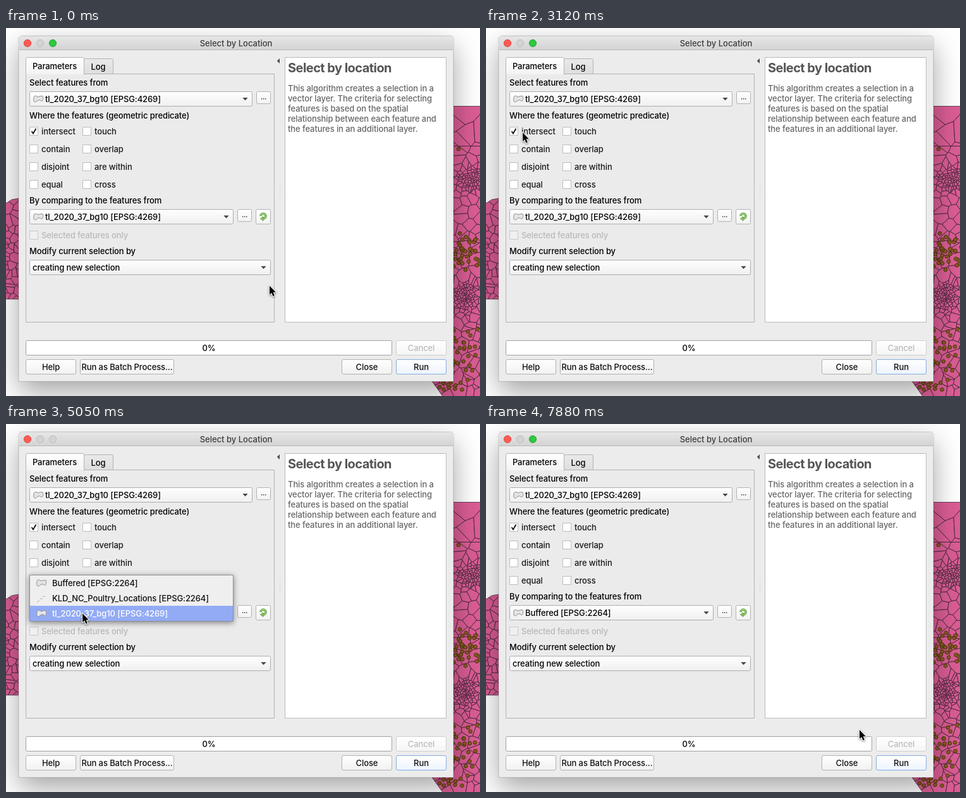
Write an HTML page with a canvas that moves like this. It is 750x581 px and loops after 8000 ms.

```html
<!DOCTYPE html>
<html lang="en">
<head>
<meta charset="utf-8">
<title>Select by Location</title>
<style>
html, body { margin: 0; width: 100%; height: 100%; overflow: hidden; background: #fff; }
canvas { display: block; width: 750px; height: 581px; }
</style>
</head>
<body>
<canvas id="stage" width="750" height="581"></canvas>
<script>
const W = 750, H = 581, LOOP = 8000;
const FONT = 'Inter, sans-serif';
const LAYERS = ['Buffered [EPSG:2264]', 'KLD_NC_Poultry_Locations [EPSG:2264]', 'tl_2020_37_bg10 [EPSG:4269]'];
let c = document.getElementById('stage').getContext('2d');

// ---- helpers ----
function random(seed) {
  return () => {
    seed = (seed + 0x6D2B79F5) | 0;
    let t = Math.imul(seed ^ (seed >>> 15), 1 | seed);
    t = (t + Math.imul(t ^ (t >>> 7), 61 | t)) ^ t;
    return ((t ^ (t >>> 14)) >>> 0) / 4294967296;
  };
}

function layer(draw) {
  const el = document.createElement('canvas');
  el.width = W;
  el.height = H;
  const saved = c;
  c = el.getContext('2d');
  draw();
  c = saved;
  return el;
}

function text(str, x, y, { size = 13, weight = 450, style = 'normal', color = '#000', align = 'left', track = -.1 } = {}) {
  c.font = `${style} ${weight} ${size}px ${FONT}`;
  c.letterSpacing = track + 'px';
  c.textAlign = align;
  c.fillStyle = color;
  c.fillText(str, x, y);
  return c.measureText(str).width;
}

function vertical(y0, y1, top, bottom) {
  const g = c.createLinearGradient(0, y0, 0, y1);
  g.addColorStop(0, top);
  g.addColorStop(1, bottom);
  return g;
}

function paint(fill, stroke, width = 1) {
  if (fill) { c.fillStyle = fill; c.fill(); }
  if (stroke) { c.strokeStyle = stroke; c.lineWidth = width; c.stroke(); }
}

// Bordered box whose outer edges are x0..x1, y0..y1.
function box(x0, y0, x1, y1, fill, stroke, r = 0) {
  c.beginPath();
  c.roundRect(x0 + .5, y0 + .5, x1 - x0 - 1, y1 - y0 - 1, r);
  paint(fill, stroke);
}

function poly(points, fill, stroke, width) {
  c.beginPath();
  points.forEach(([x, y]) => c.lineTo(x, y));
  c.closePath();
  paint(fill, stroke, width);
}

function disc(x, y, r, fill, stroke) {
  c.beginPath();
  c.arc(x, y, r, 0, 7);
  paint(fill, stroke);
}

function shadow(color, blur, dy, draw) {
  c.save();
  c.shadowColor = color;
  c.shadowBlur = blur;
  c.shadowOffsetY = dy;
  draw();
  c.restore();
}

// ---- map behind the window ----
const rect = (x0, y0, x1, y1) => [[x0, y0], [x1, y0], [x1, y1], [x0, y1]];

// Voronoi cell: cut the bounds by the bisector towards every other site.
function cell(site, sites, bounds) {
  let shape = bounds;
  for (const other of sites) {
    if (other === site) continue;
    const dx = other[0] - site[0], dy = other[1] - site[1];
    const mid = (dx * (other[0] + site[0]) + dy * (other[1] + site[1])) / 2;
    const side = p => p[0] * dx + p[1] * dy - mid;
    const next = [];
    shape.forEach((p, i) => {
      const q = shape[(i + 1) % shape.length], a = side(p), b = side(q);
      if (a <= 0) next.push(p);
      if (a * b < 0) next.push([p[0] + (q[0] - p[0]) * a / (a - b), p[1] + (q[1] - p[1]) * a / (a - b)]);
    });
    shape = next;
  }
  return shape;
}

function region(outline, sites, bounds) {
  const line = '#46293a';
  c.save();
  poly(outline, '#db5d94');
  c.clip();
  sites.forEach(s => poly(cell(s, sites, bounds), null, line, .7));
  c.restore();
  poly(outline, null, line, .8);
}

function drawMap() {
  const rnd = random(37);
  const spread = () => rnd() + rnd() + rnd() - 1.5;
  const many = (n, make) => Array.from({ length: n }, make);
  const scatter = (n, x, y, w, h) => many(n, () => [x + rnd() * w, y + rnd() * h]);
  const cluster = (n, x, y, r) => many(n, () => [x + spread() * r, y + spread() * r]);

  region([[-2, 278], [9, 271], [20, 269], [30, 269], [30, 428], [-2, 428]],
    scatter(46, -6, 265, 34, 165), rect(-20, 250, 40, 440));

  const sites = [
    ...scatter(5, 700, 128, 55, 55), ...scatter(130, 670, 190, 90, 395),
    ...cluster(85, 733, 238, 23), ...cluster(95, 727, 425, 26)
  ];
  region([[700, 123.5], [760, 123.5], [760, 590], [697, 590], [670, 552]], sites, rect(650, 100, 770, 600));
  poly([[700, 186.5], [760, 186.5]], null, '#46293a', .8);

  const dots = [[716, 191], ...cluster(38, 727, 354, 30), ...cluster(48, 722, 520, 46), ...scatter(8, 684, 558, 28, 14)];
  dots.forEach(([x, y]) => disc(x, y, 2.9, '#8b5a22', '#4f3414'));
}

// ---- widgets ----
function layerIcon(x, y) {
  c.beginPath();
  c.moveTo(x + 1, y + 3);
  c.bezierCurveTo(x + 1, y - 1, x + 5, y, x + 7, y + 1.5);
  c.bezierCurveTo(x + 9, y + 2.5, x + 15, y - 2, x + 15.5, y + 2);
  c.bezierCurveTo(x + 16, y + 6, x + 15, y + 9, x + 13, y + 8.5);
  c.bezierCurveTo(x + 10, y + 6, x + 8, y + 6, x + 5, y + 9.5);
  c.bezierCurveTo(x, y + 11, x + .5, y + 7, x + 1, y + 3);
  paint('#e4e4e4', '#8c8c8c');
}

function pointsIcon(x, y) {
  const rnd = random(5);
  c.fillStyle = '#a0a0a0';
  for (let i = 0; i < 6; i++) c.fillRect(x + i * 2.3, y + 9 - i * 1.6 + rnd() * 3, 1.3, 1.3);
}

function combo(x1, y, label, icon) {
  box(37, y, x1, y + 24, vertical(y, y + 24, '#ffffff', '#efefef'), '#adadad', 2);
  const ax = x1 - 11.5, ay = y + 10;
  poly([[ax - 4.2, ay], [ax + 4.2, ay], [ax, ay + 4.5]], '#484848');
  if (icon) layerIcon(43, y + 7);
  text(label, icon ? 62 : 42, y + 17);
}

function button(x0, x1, y, label, { color = '#111', border = '#b2b2b2', bottom = '#f1f1f1' } = {}) {
  box(x0, y, x1, y + 24, vertical(y, y + 24, '#ffffff', bottom), border, 2.5);
  text(label, (x0 + x1) / 2, y + 17, { align: 'center', color });
}

function dotsButton(x, y) {
  box(x, y, x + 23, y + 20, vertical(y, y + 20, '#ffffff', '#f2f2f2'), '#b2b2b2', 2);
  c.fillStyle = '#222';
  for (let i = 0; i < 3; i++) c.fillRect(x + 8 + i * 3, y + 11, 1.3, 1.5);
}

function checkbox(x, y, label, checked, off) {
  box(x, y, x + 14, y + 14, off ? '#f0f0f0' : '#fff', off ? '#c9c9c9' : '#bcbcbc');
  if (checked) {
    c.beginPath();
    c.moveTo(x + 3.5, y + 7);
    c.lineTo(x + 6, y + 10.5);
    c.lineTo(x + 10.5, y + 2.8);
    paint(null, '#111', 1.8);
  }
  text(label, x + 19, y + 12, { color: off ? '#b8b8b8' : '#1a1a1a' });
}

function iterateButton() {
  box(395, 286, 419, 310, vertical(286, 310, '#ffffff', '#f2f2f2'), '#b2b2b2', 2);
  for (const [color, width] of [['#5b9a3a', 3.6], ['#9ccf78', 1.8]]) {
    c.beginPath();
    c.arc(407, 297, 4, Math.PI, Math.PI * 2.5);
    paint(null, color, width);
  }
  poly([[402.5, 301], [407, 297.8], [407, 304.2]], '#9ccf78', '#5b9a3a');
}

// ---- dialog ----
function drawDialog() {
  const frame = (y, h) => {
    c.beginPath();
    c.roundRect(20, y, 688, h, [5, 5, 0, 0]);
  };
  shadow('rgba(0,0,0,.36)', 44, 16, () => {
    frame(13, 545);
    paint('#ececec');
  });
  frame(12.5, 545.5);
  paint(null, 'rgba(0,0,0,.18)');
  frame(13, 22);
  paint(vertical(13, 35, '#e6e6e6', '#d3d3d3'));
  c.fillStyle = '#b9b9b9';
  c.fillRect(20, 34, 688, 1);
  text('Select by Location', 364, 29, { align: 'center', color: '#3c3c3c', track: 0 });

  box(31, 72, 425, 465, '#ebebeb', '#b3b3b3');
  box(123, 48, 170, 73, vertical(48, 73, '#e9e9e9', '#dedede'), '#b3b3b3', [2, 2, 0, 0]);
  box(31, 46, 124, 74, vertical(46, 73, '#ffffff', '#f3f3f3'), '#b3b3b3', [2, 2, 0, 0]);
  c.fillStyle = '#ebebeb';
  c.fillRect(32, 73, 91, 2);
  text('Parameters', 77, 65, { align: 'center' });
  text('Log', 146, 66, { align: 'center' });

  text('Select features from', 37, 91);
  dotsButton(396, 100);
  text('Where the features (geometric predicate)', 37, 143);
  [['intersect', 'touch'], ['contain', 'overlap'], ['disjoint', 'are within'], ['equal', 'cross']]
    .forEach((row, i) => row.forEach((name, j) => checkbox(37 + j * 84, 156 + i * 28, name, !i && !j)));
  text('By comparing to the features from', 37, 277);
  dotsButton(366, 286);
  iterateButton();
  checkbox(37, 320, 'Selected features only', false, true);
  text('Modify current selection by', 37, 357);
  combo(390, 100, LAYERS[2], true);
  combo(419, 366, 'creating new selection');

  poly([[433, 48], [433, 56], [428.8, 52]], '#4a4a4a');
  c.fillStyle = '#c2c2c2';
  for (let y = 249; y < 266; y += 3) c.fillRect(433, y, 1, 1);

  box(441, 46, 697, 465, '#fff', '#b9b9b9');
  text('Select by location', 446, 70, { size: 20, weight: 700, color: '#555', track: -.55 });
  ['This algorithm creates a selection in a', 'vector layer. The criteria for selecting', 'features is based on the spatial',
    'relationship between each feature and', 'the features in an additional layer.']
    .forEach((line, i) => text(line, 446, 100 + i * 16, { color: '#666' }));

  box(31, 493, 611, 517, '#fff', '#a2a2a2', 2);
  text('0%', 321, 510, { align: 'center' });
  button(617, 697, 493, 'Cancel', { color: '#bcbcbc', border: '#cfcfcf', bottom: '#f5f5f5' });
  button(31, 111, 523, 'Help');
  button(117, 266, 523, 'Run as Batch Process...');
  button(531, 611, 523, 'Close');
  button(617, 697, 523, 'Run', { border: '#86addf', bottom: '#edf3fd' });
}

function lights(active) {
  disc(34, 24, 5.6, '#fb5b54', '#e0443e');
  disc(54, 24, 5.6, '#d3d3d3', '#bdbdbd');
  disc(74, 24, 5.6, active ? '#2fc840' : '#d3d3d3', active ? '#20a92f' : '#bdbdbd');
}

function popup(x1, y, current) {
  shadow('rgba(0,0,0,.45)', 9, 2, () => {
    c.fillStyle = '#efefef';
    c.fillRect(37, y, x1 - 37, 74);
  });
  box(37, y, x1, y + 74, '#efefef', '#8d8d8d');
  LAYERS.forEach((name, i) => {
    const top = y + 1 + i * 24, on = i === current;
    if (on) {
      c.fillStyle = '#93abf5';
      c.fillRect(38, top, x1 - 39, 24);
    }
    if (i === 1) pointsIcon(49, top + 6);
    else layerIcon(48, top + 7);
    text(name, 73, top + 17, { color: on ? '#fff' : '#111' });
  });
}

function tooltip() {
  shadow('rgba(0,0,0,.35)', 8, 3, () => {
    c.fillStyle = '#fff';
    c.fillRect(124, 315, 168, 58);
  });
  box(124, 315, 292, 373, '#fff', '#2e2e2e');
  const bold = { size: 11, weight: 700, track: -.15 };
  text('By comparing to the features', 128, 329, bold);
  text('from', 128, 342, bold);
  let x = 128;
  for (const [part, style] of [['Python identifier: ‘', 'normal'], ['INTERSECT', 'italic'], ['’', 'normal']])
    x += text(part, x, 367, { size: 11, style });
}

function cursor([x, y]) {
  const arrow = [[0, 0], [0, 14], [3.2, 11.2], [5.5, 16.6], [8, 15.5], [5.7, 10.2], [10, 10.2]]
    .map(([dx, dy]) => [x + dx, y + dy]);
  c.lineJoin = 'round';
  shadow('rgba(0,0,0,.4)', 3, 1, () => poly(arrow, '#fff', '#fff', 2.2));
  poly(arrow, '#000');
  c.lineJoin = 'miter';
}

// ---- timeline ----
// Each burst redraws in even steps; the pointer travels between steps `leave` and `arrive`.
const BURSTS = [
  { start: 300, end: 1190, steps: 7, leave: 0, arrive: 6, to: [150, 118] },
  { start: 2390, end: 3120, steps: 6, leave: 1, arrive: 6, to: [58, 165] },
  { start: 3860, end: 4450, steps: 5, leave: 0, arrive: 4, to: [121, 299] },
  { start: 5790, end: 6690, steps: 7, leave: 0, arrive: 6, to: [136, 257] },
  { start: 7580, end: 7880, steps: 3, leave: 0, arrive: 3, to: [591, 483] }
];
const HOME = [417, 407];
const clamp = (v, lo, hi) => Math.min(hi, Math.max(lo, v));

// Smooth step that speeds up early and settles slowly.
function ease(p) {
  const q = p ** .8;
  return q * q * (3 - 2 * q);
}

function pointer(t) {
  let pos = HOME;
  for (const { start, end, steps, leave, arrive, to } of BURSTS) {
    if (t < start) break;
    const gap = (end - start) / (steps - 1);
    const step = Math.floor((t - start + 4) / gap) + 1;
    const k = ease(clamp((step - leave) / (arrive - leave), 0, 1));
    pos = pos.map((v, i) => v + (to[i] - v) * k);
  }
  return pos;
}

const base = layer(() => {
  c.fillStyle = '#fff';
  c.fillRect(0, 0, W, H);
  drawMap();
  drawDialog();
});

function draw(t) {
  const pos = pointer(t);
  const during = (from, to) => t >= from && t < to;
  const first = during(1190, 2390), second = during(5050, 6690);
  c.drawImage(base, 0, 0);
  lights(!first && !second);
  combo(360, 286, LAYERS[t < 6690 ? 2 : 0], true);
  if (first) popup(390, 52, 2);
  if (second) popup(360, 238, clamp(Math.floor((pos[1] - 239) / 24), 0, 2));
  if (during(4450, 5050)) tooltip();
  cursor(pos);
}

function frame() {
  draw(performance.now() % LOOP);
  requestAnimationFrame(frame);
}
frame();
</script>
</body>
</html>
```
